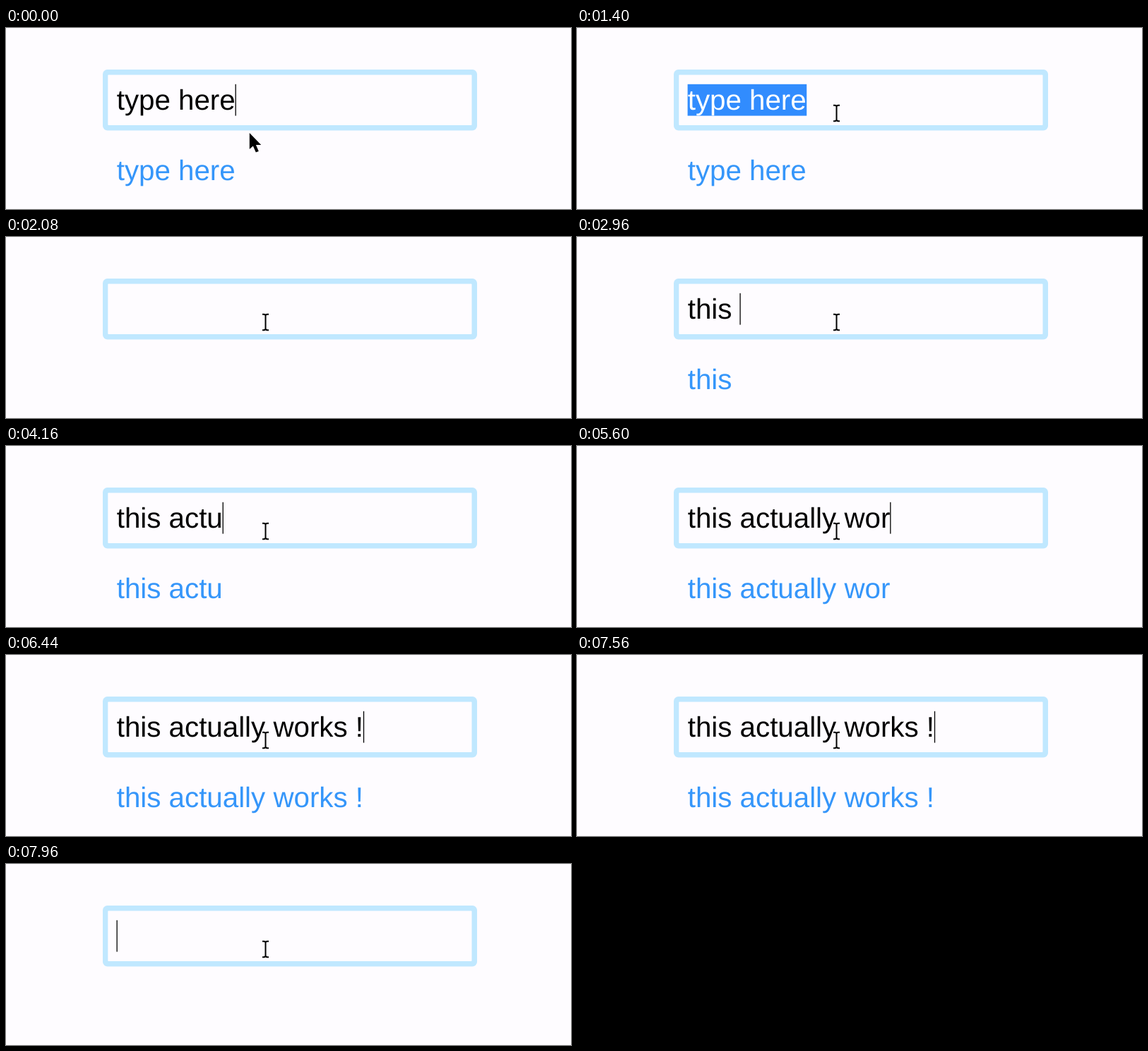
Write an HTML page that moves like this. It is 800 px wide and 257 px high and loops after 8240 ms.

```html
<!DOCTYPE html>
<html lang="en">
<head>
<meta charset="utf-8">
<title>Two-way text binding</title>
<style>
  html, body { margin: 0; width: 100%; height: 100%; overflow: hidden; background: #fefcff; }
  svg { display: block; width: 800px; height: 257px; }
  text {
    font: 40.3px "Liberation Sans", Arial, Helvetica, sans-serif;
    font-kerning: none;
    font-variant-ligatures: none;
    text-rendering: geometricPrecision;
    white-space: pre;
  }
  #echo { fill: #3596fa; }
  #selection { fill: #318cfe; }
</style>
</head>
<body>
<svg viewBox="0 0 800 257">
  <rect x="137" y="59" width="530" height="86.5" rx="6.5" fill="#c0e8ff"/>
  <rect x="144.3" y="66.5" width="515.2" height="71.5" rx="1" fill="#fefcff"/>
  <rect id="selection" x="156.6" y="79.8" height="44.8"/>
  <text id="field" x="156.7" y="116.4" xml:space="preserve"></text>
  <rect id="caret" y="79.8" width="1.3" height="44.8"/>
  <text id="echo" x="156.7" y="216" xml:space="preserve"></text>
  <path id="arrow" d="M0 0V23L5 18.4L9 27.6L13 25.9L9.1 16.9H16.4Z"/>
  <g id="beam" fill="none">
    <path id="beamShape" d="M-4.5 -11.2H-2.5Q0 -11.2 0 -8.8V8.8Q0 11.2 -2.5 11.2H-4.5M4.5 -11.2H2.5Q0 -11.2 0 -8.8V8.8Q0 11.2 2.5 11.2H4.5" stroke="#fefcff" stroke-width="3.6"/>
    <use href="#beamShape"/>
    <path d="M-4.5 -11.2H-2.5Q0 -11.2 0 -8.8V8.8Q0 11.2 -2.5 11.2H-4.5M4.5 -11.2H2.5Q0 -11.2 0 -8.8V8.8Q0 11.2 2.5 11.2H4.5" stroke="#000" stroke-width="2"/>
  </g>
</svg>
<script>
  const LOOP = 8240, STEP = 40, LEFT = 156.5;
  const START = "type here", PHRASE = "this actually works !";

  // Time at which each character of PHRASE appears
  const KEYS = [
    2360, 2440, 2520, 2640, 2760,
    3400, 3600, 3800, 4000, 4320, 4480, 4640, 4800, 4960,
    5320, 5440, 5560, 5680, 5800, 5960, 6440
  ];
  const SELECTED = [[1400, 1560], [7680, 7840]];
  const CARET_OFF = [[640, 1120], [2080, 2360], [3240, 3400], [6960, 7440]];

  const el = id => document.getElementById(id);
  const [field, echo, caret, selection, arrow, beam] =
    ["field", "echo", "caret", "selection", "arrow", "beam"].map(el);
  const within = (t, spans) => spans.some(([a, b]) => t >= a && t < b);
  const show = (node, on) => node.setAttribute("visibility", on ? "visible" : "hidden");

  function textAt(t) {
    if (t < SELECTED[0][1]) return START;
    if (t >= SELECTED[1][1]) return "";
    return PHRASE.slice(0, KEYS.filter(k => k <= t).length);
  }

  function drawPointer(t) {
    const p = Math.min(1, Math.floor(t / STEP) * STEP / 240);
    const ease = p * p * (3 - 2 * p);
    const x = 344.8 + 22.7 * ease, y = 149 - 28 * ease;
    const inField = y < 145;
    const place = `translate(${x} ${y})`;
    arrow.setAttribute("transform", place);
    beam.setAttribute("transform", place);
    show(arrow, !inField);
    show(beam, inField);
  }

  function draw(t) {
    const text = textAt(t);
    if (field.textContent !== text) field.textContent = echo.textContent = text;
    const width = text ? field.getComputedTextLength() : 0;
    const selected = within(t, SELECTED);

    field.setAttribute("fill", selected ? "#fff" : "#000");
    selection.setAttribute("width", width + 0.6);
    show(selection, selected);
    caret.setAttribute("x", LEFT + width);
    show(caret, !selected && !within(t, CARET_OFF));
    drawPointer(t);
  }

  const began = performance.now();
  function tick() {
    draw((performance.now() - began) % LOOP);
    requestAnimationFrame(tick);
  }
  tick();
</script>
</body>
</html>
```
